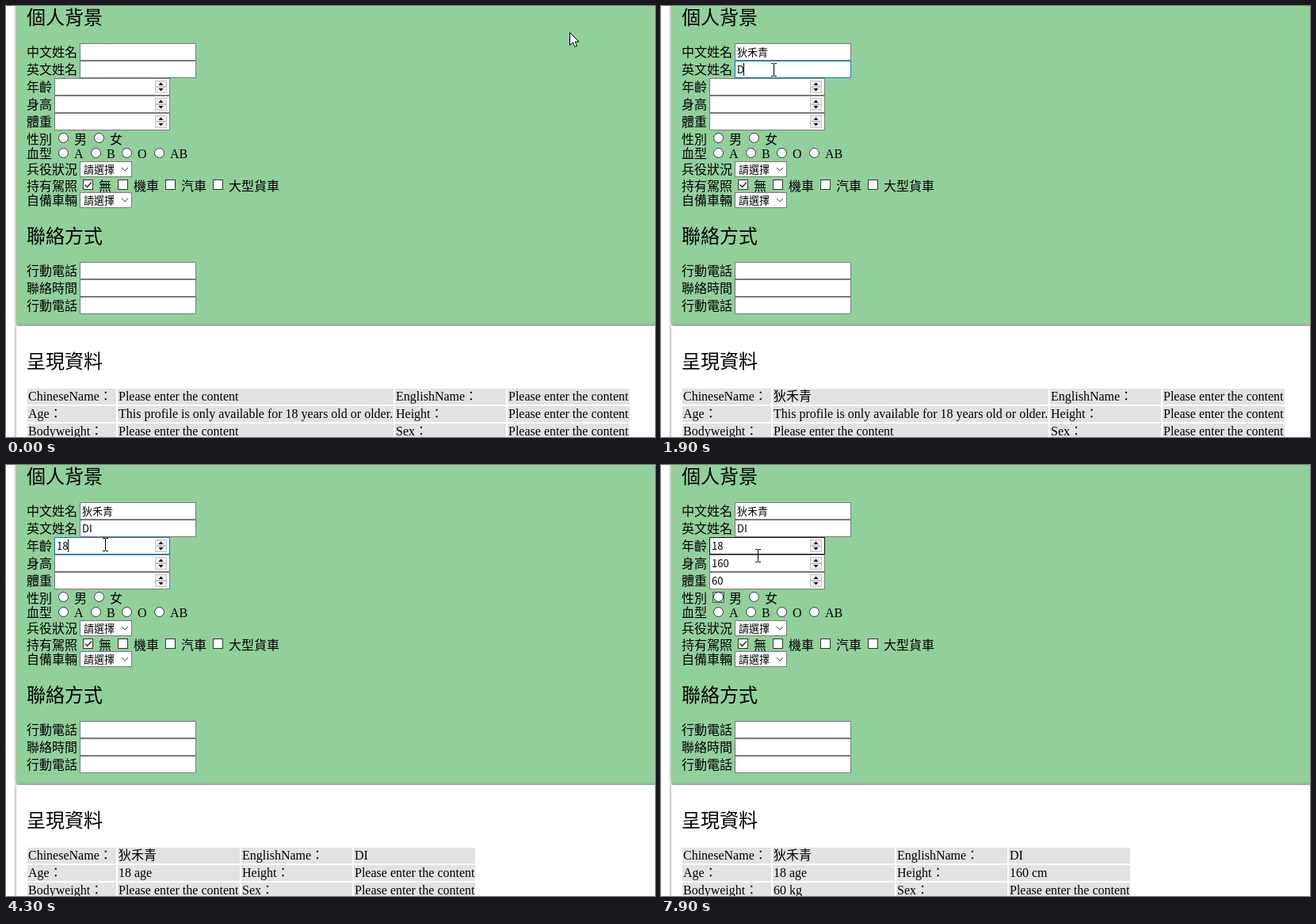
Write an HTML page that moves like this. It is 819 px wide and 544 px high and loops after 8000 ms.

```html
<!DOCTYPE html>
<html lang="zh-Hant">
<head>
<meta charset="utf-8">
<title>個人資料表單</title>
<style>
  html, body { margin: 0; width: 100%; height: 100%; overflow: hidden; background: #fff; }
  svg { display: block; }
  text { font: 300 16px "Liberation Serif", "Noto Sans CJK TC", "Noto Sans CJK JP", serif; white-space: pre; }
  .heading { font-size: 24px; font-weight: 500; }
  .control { font: 400 13px "Noto Sans CJK TC", "Noto Sans CJK JP", sans-serif; }
  .option { font-weight: 500; }
  .panel { filter: drop-shadow(0 0 2px rgba(0, 0, 0, .55)); }
</style>
</head>
<body>
<svg width="819" height="544" viewBox="0 0 819 544">
  <g id="page"></g>
  <g id="live"></g>
</svg>
<script>
const LOOP = 8000;
const NAME = '狄禾青', LATIN = 'DI';
const EMPTY = 'Please enter the content';
const UNDERAGE = 'This profile is only available for 18 years old or older.';
const page = document.getElementById('page');
const live = document.getElementById('live');

const text = (x, y, value, cls = '') => `<text x="${x}" y="${y}" class="${cls}">${value}</text>`;
const rect = (x, y, w, h, fill, extra = '') =>
  `<rect x="${x}" y="${y}" width="${w}" height="${h}" fill="${fill}" ${extra}/>`;
const box = (x, y, w, h, stroke, fill = '#fff') =>
  rect(x + .5, y + .5, w - 1, h - 1, fill, `stroke="${stroke}"`);
const line = (d, stroke = '#000', width = 1) =>
  `<path d="${d}" fill="none" stroke="${stroke}" stroke-width="${width}"/>`;
const radio = (x, y, label, baseline) =>
  `<circle cx="${x}" cy="${y}" r="6" fill="#fff" stroke="#333"/>` + text(x + 13.5, baseline, label);
const checkbox = (x, label) => box(x, 219, 13, 13, '#333') + text(x + 20, 233, label);
const select = y => box(93, y, 66, 20, '#7a7a7a') + text(98, y + 15, '請選擇', 'control option') +
  line(`M146 ${y + 8}l4 4 4-4`, '#444');

const spinner = y =>
  [3, 11].map(dy => box(188, y + dy, 15, 8, '#c4c4c4', '#f0f0f0')).join('') +
  `<path d="M192.5 ${y + 9}h6l-3-3.5zM192.5 ${y + 13}h6l-3 3.5z"/>`;

const fields = [
  { key: 'name', x: 93, y: 47, w: 147 },
  { key: 'latin', x: 93, y: 69, w: 147 },
  { key: 'age', x: 61, y: 91, w: 146, spin: true },
  { key: 'height', x: 61, y: 113, w: 146, spin: true },
  { key: 'weight', x: 61, y: 135, w: 146, spin: true },
  ...[323, 345, 367].map(y => ({ key: 'contact' + y, x: 93, y, w: 147 }))
];

const labels = [
  [64, '中文姓名'], [86, '英文姓名'], [108, '年齡'], [130, '身高'], [152, '體重'],
  [174, '性別'], [192, '血型'], [212, '兵役狀況'], [233, '持有駕照'], [251, '自備車輛'],
  [340, '行動電話'], [362, '聯絡時間'], [384, '行動電話']
];

page.innerHTML =
  rect(13, -20, 830, 422, '#92d09b', 'class="panel"') +
  rect(13, 404, 830, 180, '#fff', 'class="panel"') +
  text(26, 23, '個人背景', 'heading') +
  text(26, 299, '聯絡方式', 'heading') +
  text(26, 457, '呈現資料', 'heading') +
  labels.map(([y, label]) => text(26, y, label)).join('') +
  radio(72.5, 166.5, '男', 174) + radio(117.5, 166.5, '女', 174) +
  [[72.5, 'A'], [113.5, 'B'], [152.5, 'O'], [193.5, 'AB']]
    .map(([x, type]) => radio(x, 185.5, type, 192)).join('') +
  select(196) + select(235) +
  [[97, '無'], [141, '機車'], [201, '汽車'], [261, '大型貨車']]
    .map(([x, label]) => checkbox(x, label)).join('') +
  line('M99.5 225.5l3 3 5.5-6', '#222', 1.3);

// Each step changes only the properties it lists.
const steps = [
  [0, { cursor: [711, 33], arrow: true, focus: '', caret: false, name: '', latin: '', age: '',
        height: '', weight: '', shown: {} }],
  [100, { cursor: [590, 42] }],
  [200, { cursor: [330, 53] }],
  [300, { cursor: [142, 66], arrow: false }],
  [500, { focus: 'name', caret: true }],
  [600, { name: NAME }],
  [700, { caret: false }],
  [800, { cursor: [142, 69] }],
  [900, { cursor: [142, 75] }],
  [1000, { cursor: [142, 80] }],
  [1200, { focus: 'latin', shown: { name: NAME } }],
  [1300, { caret: true }],
  [1600, { caret: false }],
  [1900, { latin: LATIN[0], caret: true }],
  [2200, { caret: false }],
  [2500, { caret: true }],
  [2600, { latin: LATIN }],
  [3100, { cursor: [142, 71] }],
  [3200, { cursor: [138, 80] }],
  [3300, { cursor: [131, 92] }],
  [3400, { cursor: [125, 100] }],
  [3500, { focus: 'age', caret: false, shown: { name: NAME, latin: LATIN } }],
  [3600, { caret: true }],
  [4100, { caret: false }],
  [4200, { age: '1', caret: true }],
  [4300, { age: '18', shown: { name: NAME, latin: LATIN, age: '18 age' } }],
  [4600, { focus: 'height', caret: false }],
  [4700, { caret: true }],
  [5200, { caret: false }],
  [5300, { height: '1', caret: true }],
  [5700, { height: '16' }],
  [5800, { height: '160', shown: { name: NAME, latin: LATIN, age: '18 age', height: '160 cm' } }],
  [6200, { focus: 'weight', caret: false }],
  [6300, { caret: true }],
  [6800, { caret: false }],
  [7000, { weight: '60', caret: true,
           shown: { name: NAME, latin: LATIN, age: '18 age', height: '160 cm', weight: '60 kg' } }],
  [7300, { caret: false }],
  [7700, { focus: 'sex' }],
  [7800, { cursor: [123, 107] }],
  [7900, { cursor: [122, 114] }]
];

function drawField(field, state) {
  const { key, x, y, w, spin } = field;
  const [px, py] = state.cursor;
  const hovered = px >= x && px < x + w && py - 2 >= y && py - 2 < y + 22;
  const border = state.focus === key ? '#0078d7' : hovered ? '#111' : '#7a7a7a';
  return box(x, y, w, 22, border) + (spin ? spinner(y) : '') +
    `<text id="${key}" x="${x + 3}" y="${y + 16}" class="control">${state[key] || ''}</text>`;
}

function drawTable({ shown }) {
  const columns = shown.age
    ? [[27, 112], [141, 154], [297, 140], [439, 153]]
    : [[27, 112], [141, 348], [491, 140], [633, 154]];
  const rows = [
    ['ChineseName：', shown.name || EMPTY, 'EnglishName：', shown.latin || EMPTY],
    ['Age：', shown.age || UNDERAGE, 'Height：', shown.height || EMPTY],
    ['Bodyweight：', shown.weight || EMPTY, 'Sex：', EMPTY]
  ];
  return rows.map((cells, r) => cells.map((cell, c) => {
    const [x, w] = columns[c], y = 483 + 22 * r;
    return rect(x, y, w, 20, '#e2e2e2') + text(x + 1, y + 15, cell);
  }).join('')).join('');
}

function drawCursor({ cursor: [x, y], arrow }) {
  return `<g transform="translate(${x + .5} ${y + .5})">` + (arrow
    ? '<path d="M0 0V16L4 12.5 6.5 18 9 17 6.7 11.5H11.5Z" fill="#fff" stroke="#000"/>'
    : line('M-3.5-8h3M.5-8h3M0-7.5V7.5M-3.5 8h3M.5 8h3')) + '</g>';
}

function drawCaret({ focus, caret }) {
  const field = caret && fields.find(f => f.key === focus);
  if (!field) return '';
  const width = document.getElementById(focus).getComputedTextLength();
  return rect(Math.floor(field.x + 3 + width), field.y + 3, 1, 16, '#000');
}

function draw(state) {
  live.innerHTML = fields.map(field => drawField(field, state)).join('') + drawTable(state) +
    (state.focus === 'sex'
      ? rect(65.5, 160.5, 14, 13, 'none', 'stroke="#000" stroke-dasharray="1 1"') : '');
  live.insertAdjacentHTML('beforeend', drawCaret(state) + drawCursor(state));
}

let drawnCount = 0;
function tick() {
  const time = performance.now() % LOOP;
  const active = steps.filter(([start]) => start <= time);
  if (active.length !== drawnCount) {
    drawnCount = active.length;
    draw(Object.assign({}, ...active.map(([, change]) => change)));
  }
  requestAnimationFrame(tick);
}
tick();
</script>
</body>
</html>
```
